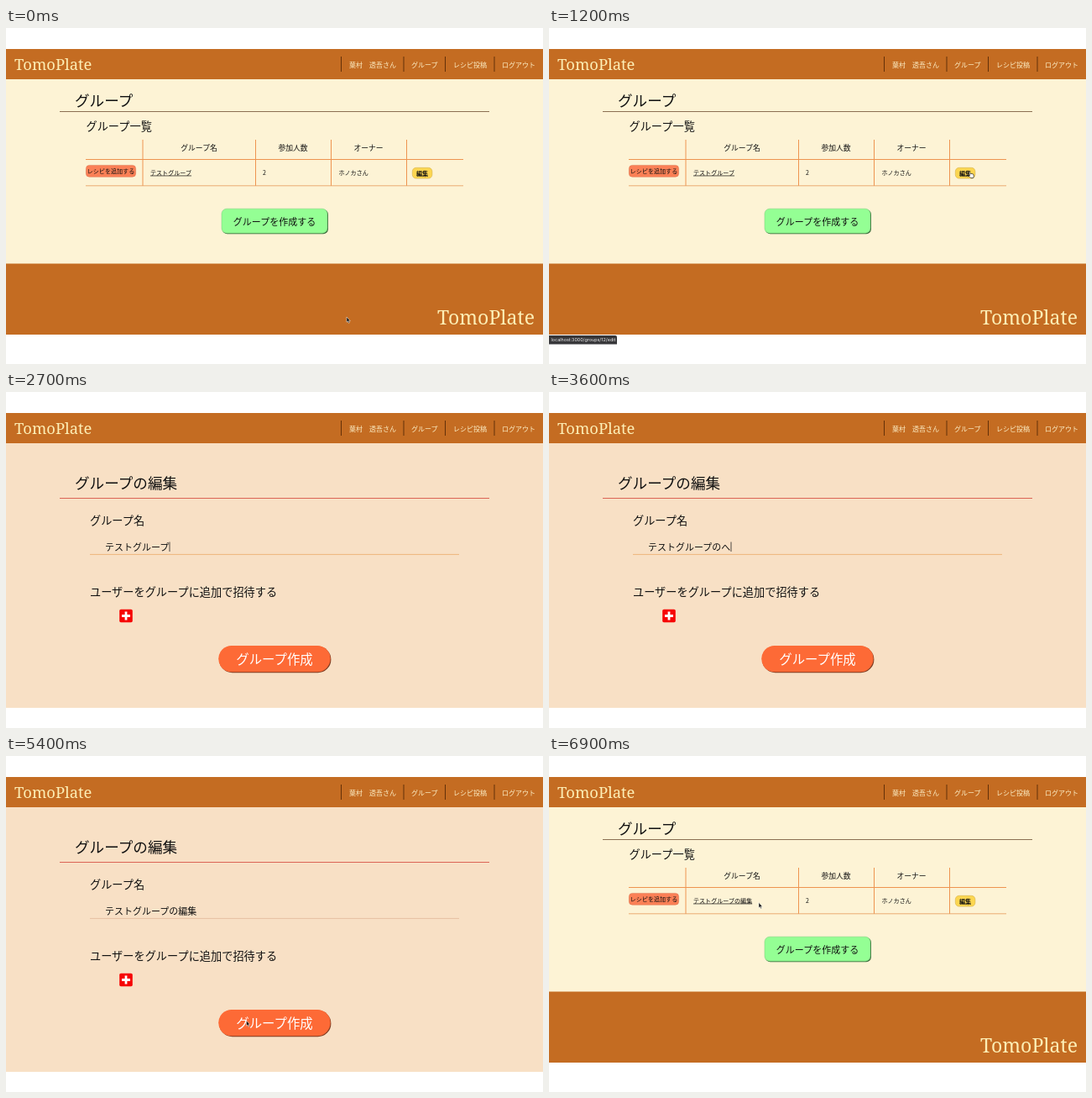
These frames come from a looping animation (640 px wide and 400 px high, 7200 ms). An HTML page:

```html
<!DOCTYPE html>
<html lang="ja">
<head>
<meta charset="utf-8">
<title>グループの編集</title>
<style>
  html, body { margin: 0; width: 100%; height: 100%; overflow: hidden; background: #fff; }
  svg { display: block; width: 640px; height: 400px; }
  text { font: 500 7.07px "Noto Sans CJK JP", sans-serif; fill: #111; white-space: pre; }
  .brand { font: 400 18.4px "Noto Serif", serif; fill: #fdeeb5; }
  .nav { font-size: 8px; font-weight: 400; fill: #fdf0c8; }
  .title { font-size: 17.6px; }
  .sub { font-size: 13.2px; }
  .head { font-size: 8.8px; text-anchor: middle; }
  .mid { text-anchor: middle; }
  .status { font: 400 5.4px Inter, sans-serif; fill: #eee; }
</style>
</head>
<body>
<svg viewBox="0 0 640 400">
  <g id="listPage">
    <rect y="61" width="640" height="220" fill="#fdf3d5"/>
    <text class="title" x="82" y="92.6">グループ</text>
    <path d="M64 99.5H576" stroke="#8b6f52"/>
    <text class="sub" x="95.5" y="122">グループ一覧</text>
    <path d="M163 133V188M297.5 133V188M387.5 133V188M477.5 133V188M95 156.5H545" stroke="#ee9450" fill="none"/>
    <path d="M95 187.8H545" stroke="#e9a468" stroke-width=".9"/>
    <text class="head" x="230" y="146.3">グループ名</text>
    <text class="head" x="342" y="146.3">参加人数</text>
    <text class="head" x="432" y="146.3">オーナー</text>
    <rect x="95.4" y="163.4" width="59.2" height="13.8" rx="4" fill="#fb8056" stroke="#d96d48" stroke-width=".5"/>
    <text class="mid" x="125" y="173">レシピを追加する</text>
    <text id="groupLink" x="172" y="174.6" text-decoration="underline"></text>
    <text x="306" y="174.6">2</text>
    <text x="396.5" y="174.6">ホノカさん</text>
    <rect x="484.3" y="166.3" width="23.6" height="12.8" rx="4.5" fill="#fcd651" stroke="#d3b04a" stroke-width=".6"/>
    <text class="mid" x="496.1" y="175.5" font-weight="700" style="font-weight:700">編集</text>
    <rect x="257.8" y="216" width="126.2" height="29.2" rx="6" fill="#3d6b3d"/>
    <rect x="257" y="215.2" width="126" height="29" rx="6" fill="#94ff94" stroke="#79c979" stroke-width=".5"/>
    <text class="mid" x="320" y="234.6" style="font-size:11px">グループを作成する</text>
    <rect y="280.5" width="640" height="84.5" fill="#c46c22"/>
    <text class="brand" x="630" y="353" text-anchor="end" style="font-size:23.1px">TomoPlate</text>
    <g id="status">
      <path d="M0 366H79Q81 366 81 368V376.5H0Z" fill="#37373a"/>
      <text class="status" x="2.5" y="373.2">localhost:3000/groups/12/edit</text>
    </g>
  </g>

  <g id="editPage">
    <rect y="61" width="640" height="315" fill="#f8e0c5"/>
    <text class="title" x="82" y="114.6">グループの編集</text>
    <path d="M64 126.5H576" stroke="#db6455"/>
    <text class="sub" x="100" y="158">グループ名</text>
    <text id="field" x="118" y="188.8" style="font-size:11px"></text>
    <path id="fieldLine" d="M100 193.4H540" stroke-width=".9"/>
    <path id="caret" stroke="#222" stroke-width=".8"/>
    <text class="sub" x="100" y="242.6">ユーザーをグループに追加で招待する</text>
    <rect x="135.2" y="258.8" width="15.6" height="15.4" rx="1.8" fill="#f60505"/>
    <path d="M138 266.5H148M143 261.5V271.5" stroke="#fff" stroke-width="2.8"/>
    <rect x="254" y="302.8" width="133.4" height="31.4" rx="15.7" fill="#7b3a20"/>
    <rect x="253.2" y="302" width="133.4" height="31.2" rx="15.6" fill="#fd6a36"/>
    <text class="mid" x="320" y="323.8" style="font-size:15.4px;fill:#fff">グループ作成</text>
  </g>

  <rect y="25" width="640" height="36" fill="#c46c22"/>
  <text class="brand" x="10" y="50">TomoPlate</text>
  <path d="M399.5 34V52M474 34V52M523.5 34V52M582 34V52" stroke="#633008"/>
  <text class="nav" x="409" y="46.6">葉村　透吾さん</text>
  <text class="nav" x="483" y="46.6">グループ</text>
  <text class="nav" x="533" y="46.6">レシピ投稿</text>
  <text class="nav" x="591" y="46.6">ログアウト</text>

  <g id="pointer" stroke-linejoin="round">
    <path id="arrow" d="M0 0V6.2L1.4 5L2.4 7.3L3.4 6.8L2.5 4.7H4.3Z" fill="#111" stroke="#fff" stroke-width=".5"/>
    <path id="hand" d="M.6 .6Q1.3 0 1.8 .8L2.6 2.6Q4.4 2 5.8 3.2L6.3 5.6L5.6 7.6H2.8L.4 5.2Q.3 4.2 1.6 4.8Z" fill="#fff" stroke="#222" stroke-width=".7"/>
    <path id="beam" d="M-1.3 -4Q0 -4 0 -3V3Q0 4 -1.3 4M1.3 -4Q0 -4 0 -3M0 3Q0 4 1.3 4" fill="none" stroke="#222" stroke-width=".7"/>
  </g>
</svg>
<script>
  const LOOP = 7200, STEP = 300;
  const $ = id => document.getElementById(id);
  const show = (id, on) => $(id).setAttribute("visibility", on ? "inherit" : "hidden");

  // Pointer moves: start, end, from, to, shape
  const moves = [
    [0, 900, [406, 344], [500, 171], "arrow"],
    [900, 1500, [500, 171], [500, 171], "hand"],
    [1500, 2100, [500, 171], [214, 185], "hand"],
    [2100, 2700, [214, 185], [214, 185], "beam"],
    [4800, 5400, [214, 185], [286.5, 315], "arrow"],
    [5400, 5700, [286.5, 315], [286.5, 315], "arrow"],
    [5700, 6900, [286.5, 315], [250, 174.5], "arrow"],
    [6900, 7200, [250, 174.5], [250, 174.5], "arrow"]
  ];

  const base = "テストグループ";
  const typing = [[3000, "ｎ"], [3300, "の"], [3600, "のへ"], [3900, "のへん"],
    [4200, "のへんしゅ"], [4500, "のへんしゅう"], [4800, "の編集"]];
  const smooth = p => p * p * (3 - 2 * p);

  function drawPointer(t) {
    const move = moves.find(([start, end]) => t >= start && t < end);
    show("pointer", !!move && t !== 4800);
    if (!move) return;
    const [start, end, from, to, shape] = move;
    const p = smooth((t - start) / (end - start));
    const [x, y] = from.map((v, i) => v + (to[i] - v) * p);
    $("pointer").setAttribute("transform", `translate(${x} ${y})`);
    for (const id of ["arrow", "hand", "beam"]) show(id, id === shape);
  }

  function draw(now) {
    const t = Math.floor(now % LOOP / STEP) * STEP;
    const editing = t >= 1500 && t < 5700;
    const focused = t >= 2400 && t < 5400;
    const typed = typing.filter(([at]) => t >= at).pop();
    const name = base + (typed ? typed[1] : "");

    show("listPage", !editing);
    show("editPage", editing);
    show("status", t >= 900 && t < 1500);
    $("status").setAttribute("opacity", t === 900 ? .6 : 1);
    $("groupLink").textContent = name;
    $("field").textContent = name;
    $("fieldLine").setAttribute("stroke", focused ? "#eeb073" : "#e5bba0");
    $("caret").setAttribute("d", `M${118 + 11 * name.length} 178.5v11.5`);
    show("caret", focused);
    drawPointer(t);
    requestAnimationFrame(draw);
  }

  const origin = performance.now();
  const frame = () => draw(performance.now() - origin);
  const nativeFrame = window.requestAnimationFrame.bind(window);
  window.requestAnimationFrame = () => nativeFrame(frame);
  frame();
</script>
</body>
</html>
```
